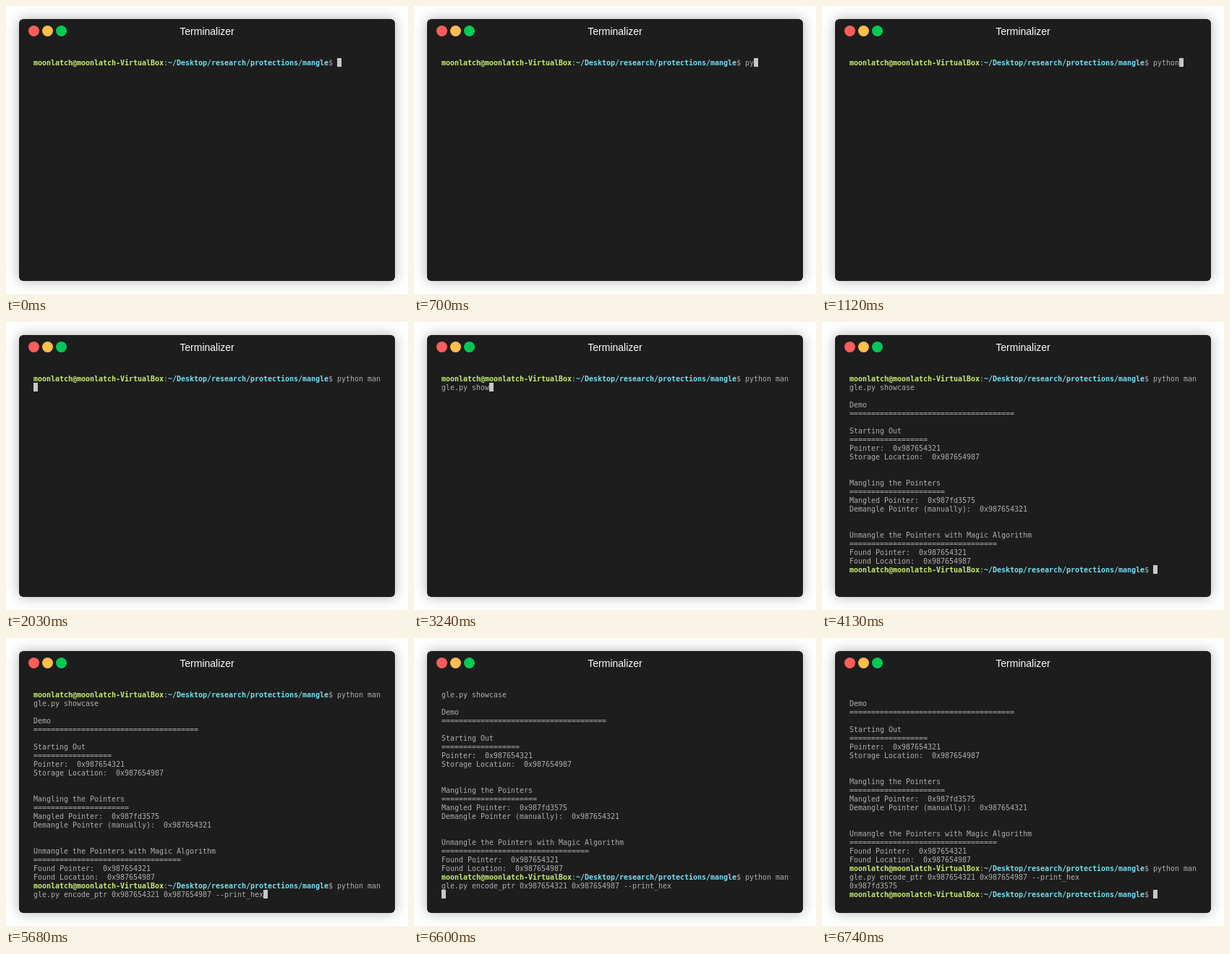
Write an HTML page that moves like this. It is 556 by 398 pixels and loops after 8000 ms.

```html
<!DOCTYPE html>
<html lang="en">
<head>
<meta charset="utf-8">
<title>Terminal</title>
<style>
  html, body { margin: 0; width: 100%; height: 100%; overflow: hidden; background: #fff; }
  .window {
    position: absolute; left: 18px; top: 18px; width: 520px; height: 362px;
    border-radius: 6px; background: #1d1d1d; box-shadow: 0 0 18px rgba(0, 0, 0, .3);
  }
  .title {
    position: absolute; left: 0; right: 0; top: 9px; text-align: center;
    font: 14px/16px "Liberation Sans", Arial, sans-serif; color: #fff;
  }
  .dot { position: absolute; top: 9px; width: 15px; height: 15px; border-radius: 50%; }
  .close { left: 13px; background: #ff5c5c; }
  .min { left: 32px; background: #ffbd4c; }
  .max { left: 51px; background: #00ca56; }
  #screen {
    position: absolute; left: 20px; top: 54px; width: 480px; height: 288px;
    font: 10px/14px "DejaVu Sans Mono", monospace; color: #afafaf;
  }
  .row { height: 12px; white-space: pre; display: flex; }
  .row span { width: 6px; height: 12px; flex: none; }
  .user { color: #c8ed71; font-weight: bold; }
  .path { color: #75dff2; font-weight: bold; }
  .cursor { background: #c7c7c7; }
</style>
</head>
<body>
<div class="window">
  <i class="dot close"></i><i class="dot min"></i><i class="dot max"></i>
  <div class="title">Terminalizer</div>
  <div id="screen"></div>
</div>
<script>
const COLS = 80, ROWS = 24, LOOP = 8000;
const USER = 'moonlatch@moonlatch-VirtualBox';
const PATH = '~/Desktop/research/protections/mangle';
const PROMPT = USER + ':' + PATH + '$ ';
const rule = n => '='.repeat(n);

const report = [
  '', 'Demo', rule(38), '',
  'Starting Out', rule(18), 'Pointer:  0x987654321', 'Storage Location:  0x987654987', '', '',
  'Mangling the Pointers', rule(22), 'Mangled Pointer:  0x987fd3575',
  'Demangle Pointer (manually):  0x987654321', '', '',
  'Unmangle the Pointers with Magic Algorithm', rule(34),
  'Found Pointer:  0x987654321', 'Found Location:  0x987654987', ''
].join('\n');

// [time, text appended to the terminal]
const events = [
  [0, PROMPT],
  [610, 'p'], [700, 'y'], [790, 't'], [870, 'h'], [960, 'o'], [1120, 'n'],
  [1600, ' '], [1750, 'm'], [1860, 'a'], [2030, 'n'], [2720, 'gle.py '],
  [2920, 's'], [3030, 'h'], [3130, 'o'], [3240, 'w'],
  [3380, 'c'], [3460, 'a'], [3540, 's'], [3690, 'e'],
  [4000, '\n'], [4080, report], [4130, PROMPT],
  [5680, 'python mangle.py encode_ptr 0x987654321 0x987654987 --print_hex'],
  [6600, '\n'], [6640, '0x987fd3575\n'], [6740, PROMPT]
];

const screen = document.getElementById('screen');

function layout(text) {
  const lines = [[]];
  const put = (ch, cls) => {
    const line = lines[lines.length - 1];
    line.push([ch, cls]);
    if (line.length === COLS) lines.push([]);
  };
  text.split(PROMPT).forEach((part, i) => {
    if (i) {
      for (const ch of USER) put(ch, 'user');
      put(':', '');
      for (const ch of PATH) put(ch, 'path');
      put('$', '');
      put(' ', '');
    }
    for (const ch of part) ch === '\n' ? lines.push([]) : put(ch, '');
  });
  put(' ', 'cursor');
  return lines.slice(-ROWS);
}

function draw(count) {
  const text = events.slice(0, count).map(e => e[1]).join('');
  screen.replaceChildren(...layout(text).map(line => {
    const row = document.createElement('div');
    row.className = 'row';
    for (const [ch, cls] of line) {
      const cell = document.createElement('span');
      cell.className = cls;
      cell.textContent = ch;
      row.append(cell);
    }
    return row;
  }));
}

let shown = 0;
const start = performance.now();
function tick() {
  const t = (performance.now() - start) % LOOP;
  const count = events.filter(e => e[0] <= t).length;
  if (count !== shown) draw(shown = count);
  requestAnimationFrame(tick);
}
tick();
</script>
</body>
</html>
```
